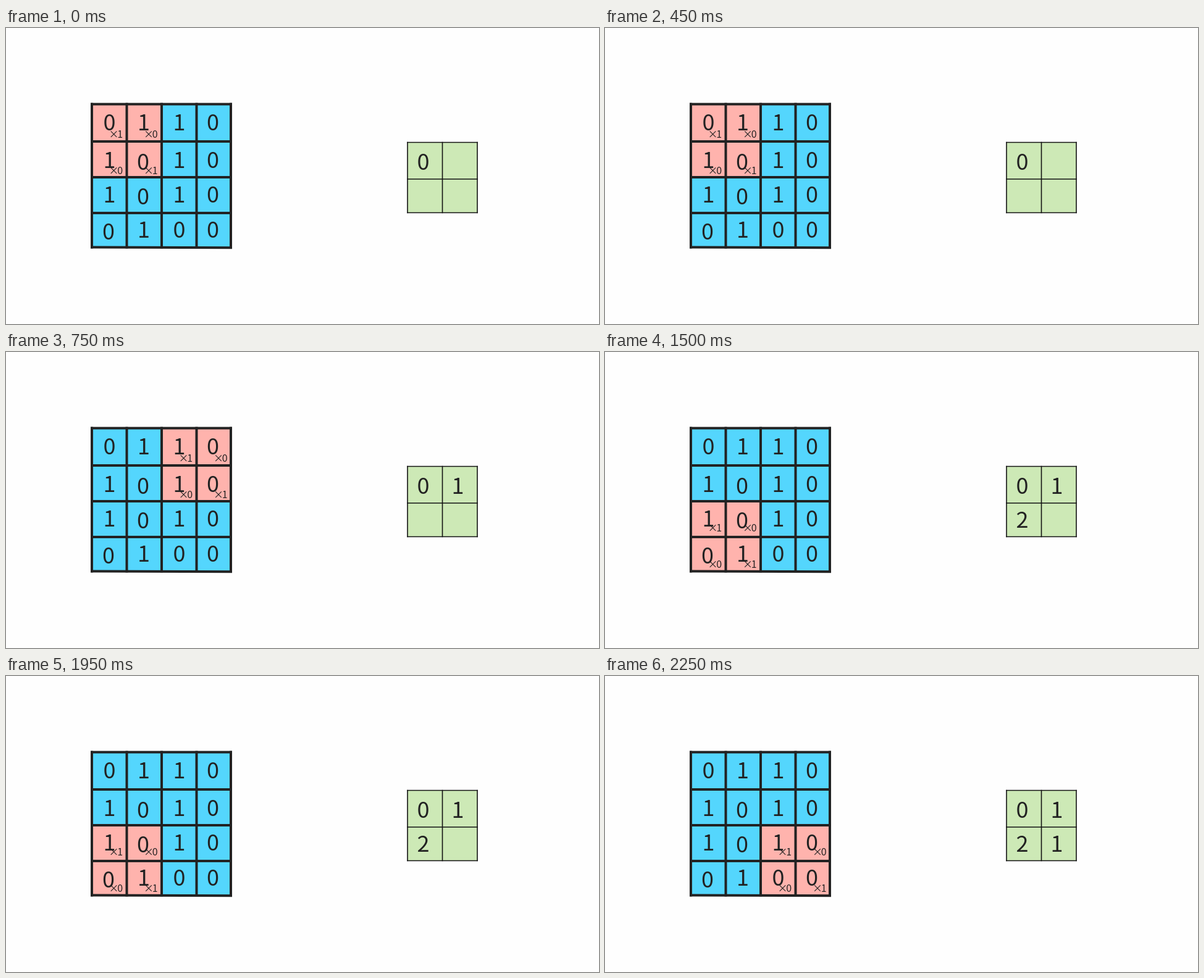
Animation, 960 px wide and 480 px high, one loop 3000 ms. Source, as an HTML page with a canvas:

```html
<!DOCTYPE html>
<html lang="en">
<head>
<meta charset="utf-8">
<title>Convolution with stride two</title>
<style>
  html, body { margin: 0; width: 100%; height: 100%; overflow: hidden; background: #fefefe; }
  canvas { display: block; }
</style>
</head>
<body>
<canvas id="stage" width="960" height="480"></canvas>
<script>
const ctx = document.getElementById('stage').getContext('2d');
const STEP = 750, INK = '#222';
const FONT = '"Noto Sans CJK SC", "Noto Sans CJK JP", "Noto Sans", sans-serif';

const input = ['0110', '1010', '1010', '0100'];
const colX = [139, 195.5, 252, 308.5, 364];
const rowY = [123.5, 184, 242, 300, 355.5];
const digitX = [167.5, 223, 280.5, 335];
const digitY = [153, 214, 270, 327];
const nudge = { '1,1': [-1, 3], '2,1': [-1, 3], '3,0': [-1.5, 3] };
const weightY = [172, 231, 285, 344];

const results = [0, 1, 2, 1];
const outX = [650, 706.5, 763], outY = [185.5, 245, 299.5];

function text(s, x, y, size) {
  ctx.font = `${size}px ${FONT}`;
  ctx.fillStyle = INK;
  ctx.fillText(s, x, y + size * 0.367);
}

function line(x1, y1, x2, y2) {
  ctx.beginPath();
  ctx.moveTo(x1, y1);
  ctx.lineTo(x2, y2);
  ctx.stroke();
}

function gridLines(xs, ys, width, color, slant) {
  const left = xs[0], right = xs.at(-1), top = ys[0], bottom = ys.at(-1);
  ctx.lineWidth = width;
  ctx.strokeStyle = color;
  ctx.lineCap = 'square';
  for (const x of xs) line(x, top, x, bottom);
  for (const y of ys) line(left, y, right, y + (y === bottom ? slant : 0));
}

function drawInput(step) {
  const col0 = step % 2 * 2, row0 = step >> 1 << 1;
  const active = (r, c) => r >> 1 === row0 >> 1 && c >> 1 === col0 >> 1;
  for (let r = 0; r < 4; r++) for (let c = 0; c < 4; c++) {
    ctx.fillStyle = active(r, c) ? '#ffb3ad' : '#54d6fd';
    ctx.fillRect(colX[c], rowY[r], colX[c + 1] - colX[c], rowY[r + 1] - rowY[r]);
  }
  gridLines(colX, rowY, 4, INK, 0.7);
  for (let r = 0; r < 4; r++) for (let c = 0; c < 4; c++) {
    const [dx, dy] = nudge[[r, c]] || [0, 0];
    text(input[r][c], digitX[c] + dx, digitY[r] + dy, 36);
    if (!active(r, c)) continue;
    const x = 174.5 + c * 56.5;
    text('×', x, weightY[r], 16);
    text(r % 2 === c % 2 ? '1' : '0', x + 10.3, weightY[r], 16);
  }
}

function drawOutput(step) {
  ctx.fillStyle = '#cde9b6';
  ctx.fillRect(outX[0], outY[0], outX[2] - outX[0], outY[2] - outY[0]);
  gridLines(outX, outY, 1.6, '#111', 0);
  for (let i = 0; i <= step; i++)
    text(results[i], 675.5 + i % 2 * 56, i < 2 ? 217 : 272, 36);
}

function draw() {
  const step = Math.floor(performance.now() / STEP) % 4;
  ctx.fillStyle = '#fefefe';
  ctx.fillRect(0, 0, 960, 480);
  ctx.textAlign = 'center';
  drawInput(step);
  drawOutput(step);
  requestAnimationFrame(draw);
}
draw();
</script>
</body>
</html>
```
